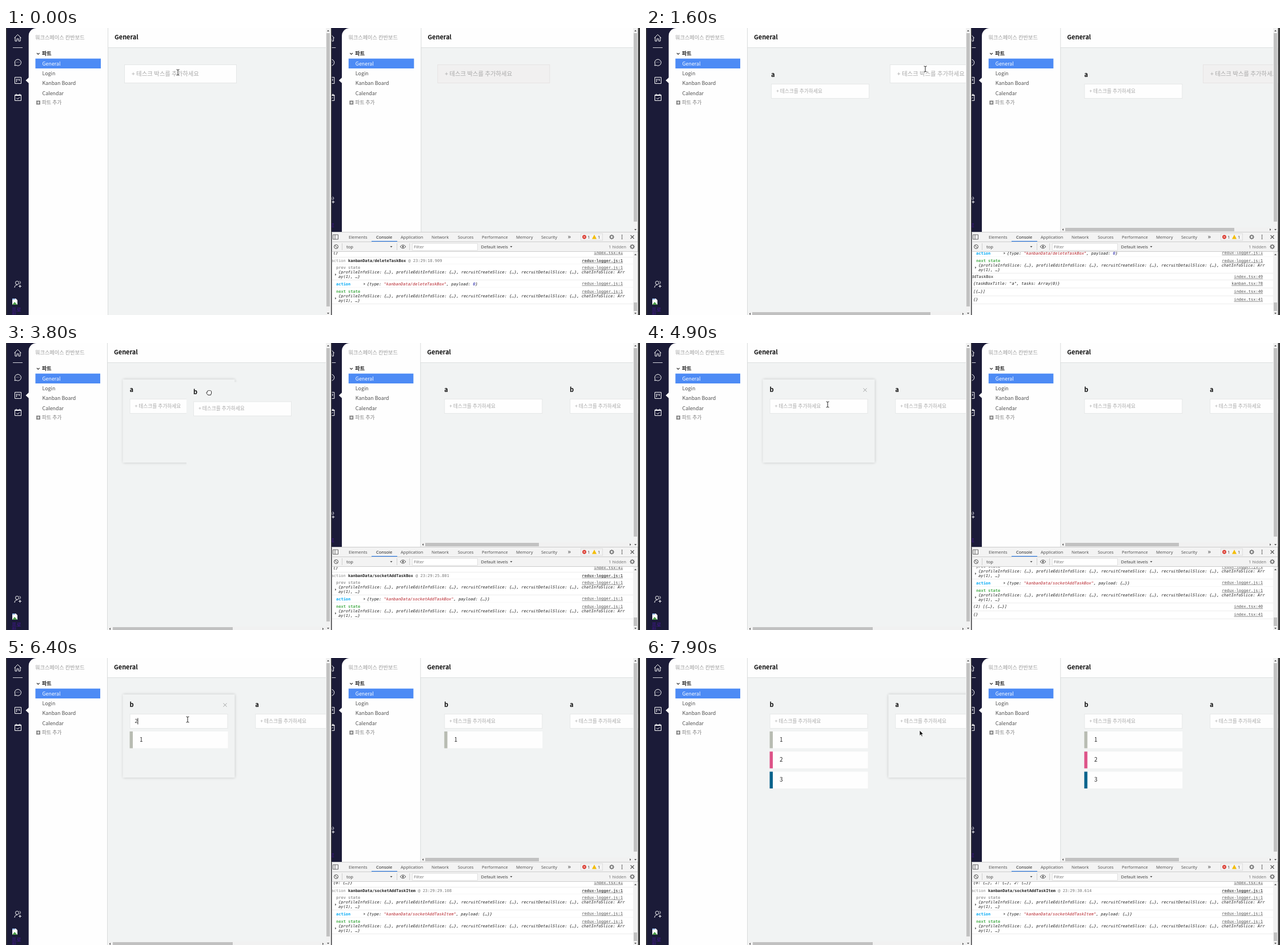
Animation, 1110 px wide and 504 px high, one loop 8 s. Source, as an HTML page with a canvas:

```html
<!DOCTYPE html>
<html lang="ko">
<head>
<meta charset="utf-8">
<title>Kanban board, two synced windows</title>
<style>
html, body { margin: 0; width: 100%; height: 100%; overflow: hidden; }
canvas { display: block; }
</style>
</head>
<body>
<canvas id="stage" width="1110" height="504"></canvas>
<script>
const ctx = document.getElementById('stage').getContext('2d');
const LOOP = 8000;
const APP = '"Noto Sans CJK KR", "Noto Sans CJK", "Noto Sans", sans-serif';
const UI = '"Noto Sans", sans-serif';
const MONO = '"DejaVu Sans Mono", monospace';
const NAVY = '#1b1b38', BOARD = '#f1f3f3', GREY = '#a9a9a9';

// ---------- timeline: every entry holds until the next one ----------
const at = (list, t) => list.filter(e => e[0] <= t).pop();

const leftBoxes = [[0, ''], [1100, 'a'], [2100, 'ab'], [4200, 'ba']];
const rightBoxes = [[0, ''], [1600, 'a'], [2800, 'ab'], [4800, 'ba']];
const leftItems = [5700, 6500, 7400], rightItems = [6100, 7000, 7700];
const boxInput = [[0, '', 0], [300, '', 1], [600, 'a', 1], [1100, '', 0], [1700, '', 1], [1900, 'b', 1]];
const taskInput = [[0, '', 0], [5000, '', 1], [5500, '1', 1], [5700, '', 1], [6200, '', 0],
  [6400, '2', 1], [6500, '', 1], [6700, '', 0], [6800, '3', 1], [7400, '', 1], [7900, '', 0]];
const hover = [[0, -1], [2500, 0], [3300, 1], [3700, 0], [7900, 1]];
const drag = [[0, null], [3700, [366, 68]], [3800, [316, 68.5]], [3900, [312, 68.5]], [4200, null]];
const cursor = [[0, 301, 78, 'beam'], [800, 345, 58, 'arrow'], [900, 384, 42, 'arrow'],
  [1100, 420, 48, 'arrow'], [1200, 465, 66, 'beam'], [1300, 489, 72, 'beam'],
  [2200, 480, 62, 'arrow'], [2300, 462, 50, 'arrow'], [2400, 425, 52, 'arrow'],
  [2500, 385, 66, 'hand'], [2600, 360, 80, 'hand'], [2700, 350, 90, 'hand'],
  [2800, 355, 95, 'hand'], [2900, 346, 86, 'hand'], [3100, 361, 87, 'hand'],
  [3300, 480, 87, 'hand'], [3700, 405, 87, 'grab'], [3800, 355, 87, 'grab'],
  [3900, 351, 87, 'grab'], [4200, 351, 87, 'hand'], [4400, 340, 94, 'hand'],
  [4500, 325, 104, 'beam'], [4600, 318, 108, 'beam'], [7900, 479, 127, 'arrow']];

// ---------- drawing helpers ----------
function rect(x, y, w, h, fill) {
  ctx.fillStyle = fill;
  ctx.fillRect(x, y, w, h);
}
function frame(x, y, w, h, fill, stroke) {
  rect(x, y, w, h, stroke);
  rect(x + 1, y + 1, w - 2, h - 2, fill);
}
// y is the middle of the capitals
function text(s, x, y, size, color, weight = 400, family = APP) {
  ctx.font = `${weight} ${size}px ${family}`;
  ctx.fillStyle = color;
  ctx.fillText(s, x, y + size * 0.36);
  return x + ctx.measureText(s).width;
}
function stroke(d, color, width = 1, fill) {
  const path = new Path2D(d);
  if (fill) { ctx.fillStyle = fill; ctx.fill(path); }
  ctx.strokeStyle = color;
  ctx.lineWidth = width;
  ctx.stroke(path);
}
function shape(d, fill) {
  ctx.fillStyle = fill;
  ctx.fill(new Path2D(d));
}
function circle(x, y, r, color, filled) {
  ctx.beginPath();
  ctx.arc(x, y, r, 0, Math.PI * 2);
  ctx.fillStyle = ctx.strokeStyle = color;
  ctx.lineWidth = 1;
  filled ? ctx.fill() : ctx.stroke();
}
const turns = { down: 0, left: Math.PI / 2, up: Math.PI, right: -Math.PI / 2 };
function triangle(x, y, dir, color = '#505050', r = 2) {
  ctx.save();
  ctx.translate(x, y);
  ctx.rotate(turns[dir]);
  shape(`M${-r} ${-r / 2}h${2 * r}l${-r} ${r * 1.2}z`, color);
  ctx.restore();
}
function clipped(x, y, w, h, draw) {
  ctx.save();
  ctx.beginPath();
  ctx.rect(x, y, w, h);
  ctx.clip();
  draw();
  ctx.restore();
}
function verticalBar(x, top, bottom, from, to) {
  rect(x, top, 9, bottom - top, '#f1f1f1');
  rect(x + 1, from, 6, to - from, '#c1c1c1');
  triangle(x + 4, top + 5, 'up');
  triangle(x + 4, bottom - 3, 'down');
}
function horizontalBar(x, y, end, from, to) {
  rect(x, y, end - x, 8, '#f1f1f1');
  rect(from, y + 1, to - from, 6, '#c1c1c1');
  triangle(x + 4, y + 4, 'left');
  triangle(end - 5, y + 4, 'right');
}

// ---------- kanban application ----------
function nav(bottomShift) {
  rect(0, 0, 60, 504, NAVY);
  stroke('M14.5 17.5l6-6 6 6M16 16v7h3v-4h3v4h3v-7', '#fff');
  rect(12, 34, 17, 1, '#d5d5dd');
  stroke('M16 63.5a5.6 5.6 0 1 1 2 2l-3 .5z', '#fff');
  for (const x of [18, 20.5, 23]) circle(x, 60, 0.6, '#fff', true);
  stroke('M15.5 86.5h11v11h-11zM18.5 89v6M21 89v3M23.5 89v4', '#fff');
  stroke('M15.5 117.5h11v10h-11zM15 118.5h12M18 115.5v2M24 115.5v2M18.5 123l2 2 3.5-3.5', '#fff');
  ctx.save();
  ctx.translate(0, bottomShift);
  circle(19.5, 447.5, 3, '#fff');
  stroke('M15 456c0-3 2-5 5-5M22 453.5h5M24.5 451v5M23.5 444.5c2.5 1 2.5 4 0 5', '#fff');
  shape('M11 475h6l3 3v8h-9z', '#fff');
  shape('M11 486l4-5 5 5z', '#4c9b46');
  stroke('M11 476h5', '#8fb4e8', 2);
  text('프로', 10, 495, 9, '#47189a');
  text('필', 10, 504, 9, '#47189a');
  ctx.restore();
}
function sidebar(edge) {
  ctx.fillStyle = '#fefefe';
  ctx.beginPath();
  ctx.roundRect(39.7, 0, edge - 39.7, 520, [14, 0, 0, 0]);
  ctx.fill();
  shape('M40.5 86.5l-6 5.5 6 5.5z', '#fefefe');
  text('워크스페이스 칸반보드', 51, 17, 9.2, '#999', 300);
  stroke('M54 44l2.3 2.3 2.3-2.3', '#222', 1.1);
  text('파트', 63, 45, 9.1, '#222', 700);
  rect(51.5, 53.7, edge - 63.5, 17.3, '#4d8bf5');
  ['General', 'Login', 'Kanban Board', 'Calendar'].forEach((s, i) =>
    text(s, 63.5, 62.3 + i * 17.4, 8.9, i ? '#505050' : '#fff', 300));
  rect(53, 127.5, 7, 7, '#8a8a8a');
  stroke('M54.5 131h4M56.5 129v4', '#fff');
  text('파트 추가', 63, 131, 8.8, '#808080', 300);
}
function field(x, y, size, hint, [, value, caret] = [0, '', 0]) {
  const end = value ? text(value, x, y, size, '#333') : x;
  if (!value) text(hint, x, y, size, GREY, 300);
  if (caret) rect(end, y - 5, 1, 11, '#222');
}
function taskBox(x, y, title, items, input, hovered) {
  if (hovered) {
    ctx.save();
    ctx.shadowColor = 'rgba(0,0,0,.2)';
    ctx.shadowBlur = 5;
    rect(x, y, 196, 146, BOARD);
    ctx.restore();
    stroke(`M${x + 176} ${y + 15.5}l6 6m0 -6l-6 6`, '#888', 0.8);
  }
  text(title, x + 12, y + 18, 11, '#111', 700);
  frame(x + 12, y + 34, 172, 26, '#fefefe', '#e6e8e8');
  field(x + 21, y + 46.5, 8.7, '+ 테스크를 추가하세요', input);
  for (let i = 0; i < items; i++) {
    const top = y + 65 + i * 35.3;
    rect(x + 12, top, 172, 29.5, '#fefefe');
    rect(x + 12, top, 5.5, 29.5, ['#b8bcb2', '#dd5388', '#0a638c'][i]);
    text(String(i + 1), x + 29.5, top + 14, 10, '#222');
  }
}
function app(view) {
  const { boxes, items, scroll = 0, hovered = -1, dragged, active } = view;
  const edge = boxes ? 177 : 178;
  rect(edge, 0, 400, 504, BOARD);
  rect(edge, 0, 400, 34, '#fefefe');
  rect(edge, 34, 400, 1, '#dcdfdf');
  text('General', edge + 12, 16.5, 10.9, '#111', 700);
  nav(active ? 0 : -148);
  sidebar(edge);
  rect(edge, 0, 1, 504, '#d9dcdc');
  const slot = i => 207 - scroll + i * 219.8;
  clipped(edge + 1, 35, 400, 470, () => {
    [...boxes].forEach((title, i) => {
      if (dragged && title === 'b') return;
      taskBox(slot(i), 64, title, title === 'b' ? items : 0,
        title === 'b' ? view.taskInput : undefined, i === hovered);
    });
    const x = slot(boxes.length);
    frame(x, 64, 197, 33, active ? '#fefefe' : '#f1f0f0', active ? '#e4e6e6' : '#e6e3e3');
    field(x + 13, 80, 10.4, '+ 테스크 박스를 추가하세요', view.boxInput);
    if (dragged) {
      rect(dragged[0], dragged[1], 197, 146, BOARD);
      taskBox(dragged[0], dragged[1], 'b', 0);
    }
  });
}

function leftWindow(t) {
  const boxes = at(leftBoxes, t)[1], scroll = t >= 3700 ? 2.5 : 0;
  clipped(0, 0, 569, 504, () => {
    app({
      boxes, scroll, active: true, hovered: at(hover, t)[1], dragged: at(drag, t)[1],
      items: leftItems.filter(e => e <= t).length,
      boxInput: at(boxInput, t), taskInput: at(taskInput, t)
    });
    if (boxes) horizontalBar(178, 498, 560, scroll ? 187 : 186, boxes.length > 1 ? (scroll ? 397 : 396) : 498);
    verticalBar(560, 0, 504, 9, 489);
  });
  rect(0, 0, 1.5, 504, '#3b3b3b');
  rect(569, 0, 2, 504, '#39393c');
}
function rightWindow(t) {
  const boxes = at(rightBoxes, t)[1];
  clipped(570.5, 0, 536, 358, () => {
    ctx.save();
    ctx.translate(548.3, 0);
    app({ boxes, items: rightItems.filter(e => e <= t).length });
    ctx.restore();
    if (boxes) horizontalBar(726, 350, 1098, 734, boxes.length > 1 ? 933 : 1030);
    verticalBar(1098, 0, 357, 9, 340);
  });
  rect(1106.5, 0, 3.5, 504, '#3b3b3b');
}

// ---------- developer tools ----------
const STATE = ['{profileInfoSlice: {…}, profileEditInfoSlice: {…}, recruitCreateSlice: {…}, recruitDetailSlice: {…}, chatInfoSlice: Arr', 'ay(1), …}'];
const mono = (s, x, y, color, style = '') => text(s, x, y, 7, color, style, MONO);

function link(s, y, bold = '') {
  ctx.font = `${bold} 7px ${MONO}`;
  const width = ctx.measureText(s).width;
  mono(s, 1080 - width, y, '#505050', bold);
  rect(1080 - width, y + 3.5, width, 0.6, '#505050');
}
const logLine = (s, source, x = 573, style = 'italic') => ({
  height: style ? 14 : 12,
  draw(y) { mono(s, x, y + 6.6, '#222', style); link(source, y + 6.6); }
});
const stateRow = (label, color) => ({
  height: 28.7,
  draw(y) {
    mono(label, 578, y + 7, color, 'bold');
    link('redux-logger.js:1', y + 7);
    triangle(577, y + 19.5, 'right', '#666');
    STATE.forEach((s, i) => mono(s, 582, y + 14.8 + i * 8, '#222', 'italic'));
  }
});
function action(name, time, payload) {
  const type = 'kanbanData/' + name;
  return [{
    height: 12, group: true,
    draw(y) {
      const x = mono('action ', 569.5, y + 7, '#888');
      mono(' @ 23:29:' + time, mono(type, x, y + 7, '#222', 'bold'), y + 7, '#777');
      link('redux-logger.js:1', y + 7, 'bold');
    }
  }, stateRow('prev state', '#9e9e9e'), {
    height: 13, group: true,
    draw(y) {
      mono('action', 578, y + 7.2, '#03a9f4', 'bold');
      triangle(627.5, y + 7.2, 'right', '#666');
      let x = mono('{type: ', 632, y + 7.2, '#222', 'italic');
      x = mono(`"${type}"`, x, y + 7.2, '#b5222a', 'italic');
      x = mono(', payload: ', x, y + 7.2, '#222', 'italic');
      x = mono(payload, x, y + 7.2, payload === '0' ? '#1a1aa6' : '#222', 'italic');
      mono('}', x, y + 7.2, '#222', 'italic');
      link('redux-logger.js:1', y + 6.5);
    }
  }, stateRow('next state', '#4caf50')];
}
const added = logLine('addTaskBox', 'index.tsx:49', 565.7, '');
const created = name => logLine(`{taskBoxTitle: "${name}", tasks: Array(0)}`, 'kanban.tsx:78');
const boxList = s => logLine(s, 'index.tsx:40');
const taskMap = s => logLine(s, 'index.tsx:41');
const pair = '(2) [{…}, {…}]';

const logs = [
  [0, taskMap('{}'), ...action('deleteTaskBox', '18.909', '0')],
  [1600, added, created('a'), boxList('[{…}]'), taskMap('{}')],
  [1700, ...action('socketAddTaskBox', '24.435', '{…}')],
  [2800, added],
  [2900, created('b'), boxList(pair), taskMap('{}')],
  [3000, ...action('socketAddTaskBox', '25.801', '{…}')],
  [4800, boxList(pair), taskMap('{}')],
  [6100, boxList(pair), taskMap('{0: {…}}')],
  [6400, ...action('socketAddTaskItem', '29.108', '{…}')],
  [7000, boxList(pair), taskMap('{0: {…}, 1: {…}}')],
  [7100, ...action('socketAddTaskItem', '29.898', '{…}')],
  [7700, boxList(pair), taskMap('{0: {…}, 1: {…}, 2: {…}}')],
  [7900, ...action('socketAddTaskItem', '30.614', '{…}')]
];

function consoleLog(t) {
  rect(570.5, 393, 527.5, 111, '#fff');
  const rows = logs.filter(e => e[0] <= t).flatMap(e => e.slice(1));
  clipped(571, 393, 527, 111, () => {
    let y = 484;
    while (rows.length && y > 393) {
      const row = rows.pop();
      rect(570, Math.round(y), 528, 1, row.group ? '#f7f7f7' : '#ececec');
      y -= row.height;
      row.draw(y);
    }
  });
  verticalBar(1098, 393, 504, 482, 497);
}
function gear(x, y) {
  for (let i = 0; i < 8; i++) {
    const a = i * Math.PI / 4;
    circle(x + 3.3 * Math.cos(a), y + 3.3 * Math.sin(a), 1, '#666', true);
  }
  circle(x, y, 2.4, '#666');
}
function devTools(t) {
  const ui = (s, x, y, color = '#444') => text(s, x, y, 7.5, color, 400, UI);
  rect(570.5, 358, 536, 35, '#f3f3f3');
  for (const y of [358, 375, 392]) rect(570.5, y, 536, 1, '#ccc');
  stroke('M572.5 363h9v8h-9zM576 363v8', '#666');
  const tabs = { Elements: 600, Console: 648, Application: 691, Network: 745, Sources: 791, Performance: 833, Memory: 893, Security: 937 };
  for (const name in tabs) ui(name, tabs[name], 367, name === 'Console' ? '#222' : '#555');
  rect(640, 374, 45, 1, '#1a73e8');
  text('»', 983.5, 366, 11, '#555', 400, UI);
  frame(1006, 360.5, 39, 13, '#f3f3f3', '#dedede');
  circle(1012.5, 367, 3.4, '#d93025', true);
  stroke('M1011 365.5l3 3m0-3l-3 3', '#fff', 0.9);
  ui('1', 1018, 367);
  shape('M1030 363l4 7.5h-8z', '#f4bd00');
  ui('1', 1036, 367);
  gear(1060.5, 367);
  for (const y of [364, 367, 370]) circle(1078.5, y, 0.9, '#555', true);
  stroke('M1093.5 364l6 6m0-6l-6 6', '#555', 1.1);

  circle(578, 384, 3.5, '#555');
  stroke('M575.5 381.5l5 5', '#555');
  for (const x of [588, 684, 706]) rect(x, 378, 1, 12, '#d0d0d0');
  ui('top', 596, 384);
  triangle(674.5, 384, 'down');
  stroke('M690 384q5-6 10 0q-5 6-10 0z', '#555');
  circle(695, 384, 1.6, '#555', true);
  frame(711, 378, 115, 13, '#fff', '#e2e2e2');
  ui('Filter', 714, 384, '#777');
  ui('Default levels', 831.5, 384);
  triangle(884.5, 384, 'down');
  ui('1 hidden', 1055, 384, '#777');
  gear(1096.5, 384);
  consoleLog(t);
  rect(1106.5, 358, 3.5, 146, '#3b3b3b');
}

// ---------- pointer ----------
const BEAM = 'M-2.5 -5q2 0 2.5 1q.5 -1 2.5 -1M0 -4v8M-2.5 5q2 0 2.5 -1q.5 1 2.5 1';
const pointers = {
  beam() {
    stroke(BEAM, '#fff', 2.2);
    stroke(BEAM, '#222');
  },
  arrow() { stroke('M0 0v9.5l2.2-2 1.6 3.6 1.6-.8-1.6-3.4h3z', '#fff', 0.8, '#111'); },
  hand() { stroke('M-1.5 -4q1.2 -1.4 2 0l.5 3.4 4 .8q1.2 .4 1 2l-.7 3h-5.5l-4-4.4q0-1.4 1.6-.9l1.6 1.2z', '#222', 1, '#fff'); },
  grab() { stroke('M-2.5 -2.5q1-1.6 2-.6q1-1 2-.1q1.2-.8 1.9.3q1.2 0 1.2 1.4v2.6l-1.2 3.2h-4.8l-2.8-3.6q0-1.8 1.7-1.2z', '#222', 1, '#fff'); }
};
function pointer(t) {
  const [, x, y, kind] = at(cursor, t);
  ctx.save();
  ctx.translate(x, y);
  pointers[kind]();
  ctx.restore();
}

function draw() {
  const t = performance.now() % LOOP;
  leftWindow(t);
  rightWindow(t);
  devTools(t);
  pointer(t);
  requestAnimationFrame(draw);
}
draw();
</script>
</body>
</html>
```
